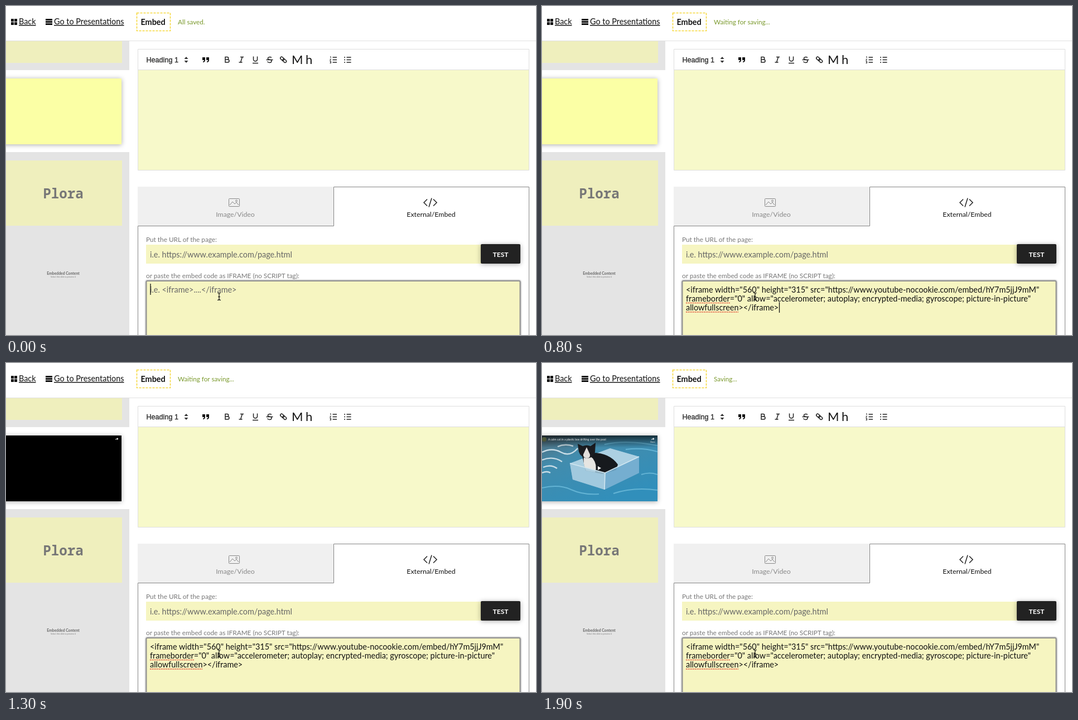
An HTML page for the animation above (2000 ms loop, 950 by 590 pixels).

```html
<!DOCTYPE html>
<html lang="en">
<head>
<meta charset="utf-8">
<title>Slide editor</title>
<style>
  html, body { margin: 0; width: 100%; height: 100%; overflow: hidden; background: #fff; }
  svg { display: block; font: 14.4px Lato, sans-serif; fill: #111; }
  .small { font-size: 11.8px; fill: #777; }
  .hint { fill: #666; }
  .tab { font-size: 12.3px; }
  .line { fill: none; stroke: #222; stroke-width: 1.5; }
  .edge { fill: none; stroke: #858585; }
  .squiggle { fill: none; stroke: #e0442e; stroke-width: 1.6; stroke-dasharray: 2 1.2; }
  .shade { filter: drop-shadow(0 1px 4px #0005); }
  .glow { filter: drop-shadow(0 0 1.5px #777); }
</style>
</head>
<body>
<svg width="950" height="590" viewBox="0 0 950 590">
  <defs>
    <linearGradient id="water" x2=".6" y2="1">
      <stop stop-color="#536b78"/><stop offset=".35" stop-color="#428cad"/><stop offset="1" stop-color="#318fbb"/>
    </linearGradient>
    <linearGradient id="dim" x2="0" y2="1">
      <stop stop-color="#000a"/><stop offset="1" stop-color="#0000"/>
    </linearGradient>
    <clipPath id="slide"><rect y="130" width="207" height="118"/></clipPath>
  </defs>

  <!-- header -->
  <path d="M9 23h5v5h-5zM15 23h5v5h-5zM9 29h5v5h-5zM15 29h5v5h-5zM71 23h12v3h-12zM71 27h12v3h-12zM71 31h12v3h-12z"/>
  <g text-decoration="underline">
    <text x="23" y="33">Back</text>
    <text x="86" y="33">Go to Presentations</text>
  </g>
  <rect x="234.5" y="12.5" width="60" height="32" fill="none" stroke="#f5d83c" stroke-width="1.6" stroke-dasharray="4 2"/>
  <text x="241.5" y="34" font-weight="700">Embed</text>
  <text id="status" x="308" y="33" font-size="11.7" fill="#7a992c"></text>
  <path d="M0 62.5H950" stroke="#e1e1e1"/>

  <!-- slide list -->
  <path d="M0 63H221V115H0zM0 262H221V590H0z" fill="#e4e4e4"/>
  <path d="M0 63H208V102H0zM0 277H208V394H0z" fill="#efefbd"/>
  <rect id="thumb" class="shade" x="-10" y="130" width="217" height="118"/>
  <g id="photo" clip-path="url(#slide)">
    <rect y="130" width="207" height="118" fill="url(#water)"/>
    <path d="M0 160q18-9 34 0t30-7M0 174q20-8 36 3M2 187q14-6 25 2M0 197q9-4 15 0M28 150q13-6 28-1" fill="none" stroke="#c9dde6" stroke-width="2.4"/>
    <path d="M112 146q40-9 95 2M150 155q30-4 57 4M0 224q30-7 52 3t50 8M128 234q36-12 79-6M178 200q15-5 29 0" fill="none" stroke="#63b3d4" stroke-width="2"/>
    <path d="M50 180L122 153L174 168V197L112 227L55 209z" fill="#86b8d4"/>
    <path d="M50 180L122 153L174 168L113 197z" fill="#acd0e2"/>
    <path d="M72 166Q77 160 91 161Q121 161 136 182L133 192L108 199L78 193z" fill="#16191d"/>
    <path d="M75 168Q83 164 91 171Q100 183 95 196L79 193Q73 181 75 168z" fill="#e6e5e2"/>
    <path d="M64 145L73 149Q80 146 87 149L96 143L95 160Q92 170 81 171Q69 169 66 159z" fill="#1b1c20"/>
    <path d="M80 151L86 164Q87 171 80 171Q73 169 74 164z" fill="#e3dfdc"/>
    <path d="M50 180L113 197L112 227L55 209z" fill="#a6cde1" opacity=".85"/>
    <path d="M113 197L174 168V197L112 227z" fill="#74add0" opacity=".9"/>
    <path d="M50 180L113 197L174 168M113 197L112 227" fill="none" stroke="#d2e7f0" stroke-width="1.6"/>
    <rect y="130" width="207" height="22" fill="url(#dim)"/>
    <circle cx="4" cy="137" r="4" fill="#4d5739"/>
    <text x="11" y="139" font-size="5" fill="#eee">A calm cat in a plastic box drifting over the pool</text>
    <path d="M100 185L106 188.500L100 192z" fill="#fff"/>
    <text x="194" y="143" font-size="3.500" fill="#ddd">Share</text>
  </g>
  <path id="share" d="M196 138q0-2.500 3-2.500v-1.500l2.500 2l-2.500 2v-1.500q-2 0-3 1.500z" fill="#fff"/>
  <g text-anchor="middle">
    <text x="102.500" y="345" font-family="'Noto Sans Mono', monospace" font-size="24.200" font-weight="700" fill="#777">Plora</text>
    <text x="102.500" y="482" font-size="6.800" font-weight="700" fill="#666">Embedded Content</text>
    <text x="102.500" y="486.500" font-size="3.600" fill="#777">Select this slide to preview it</text>
  </g>

  <!-- text editor -->
  <rect x="236" y="115" width="702" height="179" fill="#f7f9ca"/>
  <path d="M236.500 77.500H937.500V294.500H236.500zM236.500 114.500H937.500" fill="none" stroke="#dedede"/>
  <text x="251.500" y="101" font-family="'Liberation Sans', sans-serif" font-size="12.600" fill="#222" stroke="#222" stroke-width=".3">Heading 1</text>
  <path d="M319.500 95L323 91L326.500 95zM319.500 98L323 102L326.500 98z" fill="#333"/>
  <path d="M352 92h5v5q0 4-4 4v-1.500q2 0 2-2.500h-3zM359 92h5v5q0 4-4 4v-1.500q2 0 2-2.500h-3z"/>
  <g class="line">
    <path d="M393 91.500h3.500a2.100 2.100 0 0 1 0 4.500h-3.500zM393 96h4.500a2.500 2.500 0 0 1 0 5h-4.500z"/>
    <path d="M420 91.500h6M417.500 101h6M423.500 91.500l-3 9.500"/>
    <path d="M443.500 90.500v5a3.500 3.500 0 0 0 7 0v-5M442 102.500h10"/>
    <path d="M476 92.500q-3-2-6 0q-2 3 2 3.500t4 2.500q0 3-3.500 3q-3 0-4-2M466.500 96.500h12"/>
    <g transform="rotate(42 497 96.500)">
      <rect x="490.500" y="94" width="7.500" height="4.500" rx="2.200"/>
      <rect x="496" y="94" width="7.500" height="4.500" rx="2.200"/>
    </g>
    <path d="M585.500 92h7.500M585.500 96.500h7.500M585.500 101h7.500M610.500 92h8M610.500 96.500h8M610.500 101h8"/>
    <path d="M606 92h2M606 96.500h2M606 101h2"/>
    <path d="M581 91l1-.5v3M580.500 95.500h2l-2 2.500h2M580.500 99.500h2v3h-2M581 101h1.500" stroke-width=".9"/>
  </g>
  <g font-size="22"><text x="512" y="104">M</text><text x="537" y="104">h</text></g>

  <!-- tabs -->
  <rect x="236" y="324" width="351" height="70" fill="#f0f0f0"/>
  <path class="edge" d="M236.500 590V394.500H587.500V324.500H937.500V590"/>
  <g fill="none" stroke="#888">
    <rect x="399.500" y="345.500" width="19" height="14" rx="1"/>
    <path d="M401 357l5-6l4 4l3-3l4 5"/><circle cx="413" cy="349.500" r="1.500"/>
  </g>
  <path class="line" d="M755 346.500l-6 6l6 6M766 346.500l6 6l-6 6M763 344.500l-5 16"/>
  <g class="tab" text-anchor="middle">
    <text x="411" y="378" fill="#888">Image/Video</text>
    <text x="762" y="378">External/Embed</text>
  </g>

  <!-- form -->
  <text class="small" x="251" y="423">Put the URL of the page:</text>
  <rect x="251" y="428" width="601" height="34" fill="#f6f5c1"/>
  <text class="hint" x="258" y="450.500">i.e. https://www.example.com/page.html</text>
  <rect class="shade" x="851" y="427" width="71" height="35" rx="2" fill="#222"/>
  <text x="886.500" y="449.500" font-size="12" font-weight="700" fill="#fff" text-anchor="middle">TEST</text>
  <text class="small" x="251" y="487.500">or paste the embed code as IFRAME (no SCRIPT tag):</text>
  <rect class="glow" x="251.500" y="493" width="670" height="120" rx="2" fill="#f6f5c1" stroke="#929292" stroke-width="2"/>
  <text id="hint" class="hint" x="258" y="513.500">i.e. &lt;iframe&gt;....&lt;/iframe&gt;</text>
  <g id="code">
    <text x="258" y="513.500">&lt;iframe width="560" height="315" src="https://www.youtube-nocookie.com/embed/hY7m5jjJ9mM"</text>
    <text x="258" y="529.700">frameborder="0" allow="accelerometer; autoplay; encrypted-media; gyroscope; picture-in-picture"</text>
    <text x="258" y="546">allowfullscreen&gt;&lt;/iframe&gt;</text>
    <path class="squiggle" d="M258 532.500H337M258 548.800H352"/>
  </g>
  <path id="caret" stroke="#111" stroke-width="1.300"/>
  <path d="M379 514.500q3 0 3 2q0-2 3-2M382 516V526M379 527.500q3 0 3-2q0 2 3 2M380 521.500h4" fill="none" stroke="#111" stroke-width="1.200"/>
</svg>
<script>
  const $ = id => document.getElementById(id);
  const show = (id, on) => $(id).style.display = on ? '' : 'none';
  const PASTE = 600, BLACK = 900, SHARE = 1200, LOADED = 1400, SAVE = 1800, BLINK = 400;

  function draw() {
    const t = performance.now() % 2000;
    const pasted = t >= PASTE;
    $('status').textContent = !pasted ? 'All saved.' : t < SAVE ? 'Waiting for saving...' : 'Saving...';
    show('hint', !pasted);
    show('code', pasted);
    $('thumb').setAttribute('fill', t < BLACK ? '#fbffa5' : '#000');
    show('share', t >= SHARE);
    show('photo', t >= LOADED);
    // pasting restarts the blink
    show('caret', pasted ? (t - PASTE) % (2 * BLINK) < BLINK : t < 300);
    $('caret').setAttribute('d', pasted ? 'M425.500 531V550' : 'M259 498V518');
    requestAnimationFrame(draw);
  }
  draw();
</script>
</body>
</html>
```
